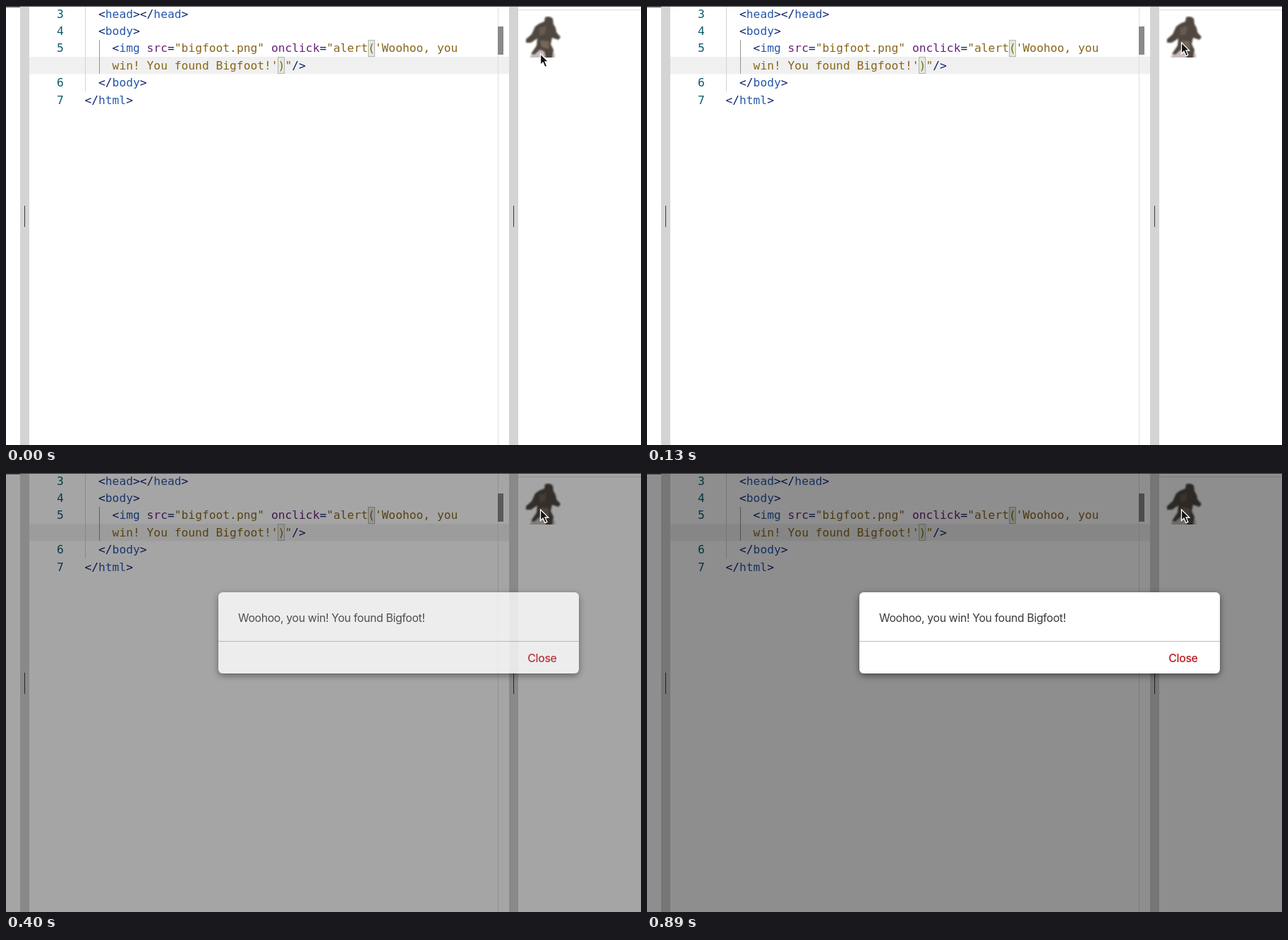
Write an HTML page that moves like this. It is 900 px wide and 622 px high and loops after 1.13 s.

```html
<!DOCTYPE html>
<html lang="en">
<head>
<meta charset="utf-8">
<title>Click alert</title>
<style>
  html, body { margin: 0; width: 100%; height: 100%; overflow: hidden; background: #fff; }
  svg { display: block; width: 900px; height: 622px; }

  .code text { font: 16.27px "DejaVu Sans Mono", monospace; white-space: pre; }
  .num { fill: #0b5a6c; }
  .punct { fill: #10206c; }
  .tag { fill: #2457ac; }
  .attr { fill: #69207a; }
  .str { fill: #87661a; }
  .bar { fill: #d4d4d4; }
  .grip { fill: #3a3a3a; }
  .match { fill: #e3e9de; stroke: #b4b4b4; }

  .dialog text { font: 15.8px Inter, sans-serif; letter-spacing: -.33px; fill: #3a3a3a; }
  .dialog .close { font-weight: 500; fill: #bd1a20; }
  .panel { fill: #fff; filter: drop-shadow(0 3px 5px rgba(0, 0, 0, .5)); }

  .cursor { animation: rise 1130ms step-end infinite; }
  .shade, .dialog { animation: appear 1130ms step-end infinite; }

  @keyframes rise {
    0% { transform: translate(757px, 67px); }
    6.19% { transform: translate(757px, 56px); }
    11.5%, 100% { transform: translate(757px, 51px); }
  }
  @keyframes appear {
    0% { opacity: 0; }
    35.39% { opacity: .8; }
    41.59% { opacity: .995; }
    46.9%, 100% { opacity: 1; }
  }
</style>
</head>
<body>
<svg viewBox="0 0 900 622">
  <defs>
    <filter id="soft" x="-20%" y="-20%" width="140%" height="140%">
      <feGaussianBlur stdDeviation="1"/>
    </filter>
    <clipPath id="crop"><rect x="735" y="14" width="52" height="59"/></clipPath>
  </defs>

  <!-- Editor panes -->
  <rect width="900" height="622" fill="#fff"/>
  <rect x="33" y="72" width="680" height="24.4" fill="#f0f0f0"/>
  <rect x="112" y="1" width="1" height="120" fill="#d3d3d3"/>
  <rect x="132" y="48" width="1" height="48" fill="#939393"/>
  <rect x="697" y="1" width="1" height="621" fill="#dedede"/>
  <rect x="697" y="29" width="8" height="40" fill="#8a8a8a"/>
  <rect class="bar" x="20" width="13" height="622"/>
  <rect class="bar" x="713" width="13" height="622"/>
  <rect class="grip" x="26" y="283" width="1" height="30"/>
  <rect class="grip" x="719" y="283" width="1" height="30"/>
  <rect x="726" y="5" width="174" height="1" fill="#dcdcdc"/>
  <rect width="900" height="1" fill="#4c4c4c"/>
  <rect width="20" height="2" fill="#4c5158"/>

  <!-- Code -->
  <rect class="match" x="513.5" y="48.5" width="9" height="23"/>
  <rect class="match" x="385.5" y="72.5" width="9" height="23"/>
  <g class="code">
    <g class="num">
      <text x="72" y="16.5">3</text>
      <text x="72" y="40.9">4</text>
      <text x="72" y="65.3">5</text>
      <text x="72" y="114.1">6</text>
      <text x="72" y="138.5">7</text>
    </g>
    <g class="punct">
      <text x="131" y="16.5">&lt;<tspan class="tag">head</tspan>&gt;&lt;/<tspan class="tag">head</tspan>&gt;</text>
      <text x="131" y="40.9">&lt;<tspan class="tag">body</tspan>&gt;</text>
      <text x="150.6" y="65.3">&lt;<tspan class="tag">img</tspan> <tspan class="attr">src</tspan>=<tspan class="str">"bigfoot.png"</tspan> <tspan class="attr">onclick</tspan>=<tspan class="str">"alert('Woohoo, you</tspan></text>
      <text x="150.6" y="89.7"><tspan class="str">win! You found Bigfoot!')"</tspan>/&gt;</text>
      <text x="131" y="114.1">&lt;/<tspan class="tag">body</tspan>&gt;</text>
      <text x="111.4" y="138.5">&lt;/<tspan class="tag">html</tspan>&gt;</text>
    </g>
  </g>

  <!-- Soft figure -->
  <g clip-path="url(#crop)">
    <g filter="url(#soft)">
      <path d="M748 62L762 58L778 68V76H741Z" fill="#c9bdc0"/>
      <path d="M764 16Q771 13 775 18L776 26Q780 31 780 37L786 44L783 48L774 45L772 54L776 62L774 76H765L763 65L757 62L749 69L744 68L752 56L753 46L744 52L737 52L737 47L745 40L750 29Q756 24 763 22Z" fill="#50473f"/>
      <path d="M756 31L766 28L764 40L756 42Z" fill="#665b51"/>
      <path d="M757 49L769 50L770 61L759 58Z" fill="#75675a"/>
    </g>
  </g>

  <!-- Alert -->
  <rect class="shade" width="900" height="622" fill="#000" fill-opacity=".443"/>
  <g class="dialog">
    <rect class="panel" x="301" y="169" width="511" height="115" rx="6"/>
    <rect x="301" y="238" width="511" height="1" fill="#bdbdbd"/>
    <text x="329" y="210.8">Woohoo, you win! You found Bigfoot!</text>
    <text class="close" x="739.3" y="267.6">Close</text>
  </g>

  <g class="cursor">
    <path d="M.5 .8V16.4L4 13.2L6.8 19.6L9.8 18.3L7 12H11.8Z" fill="#111" stroke="#fff" stroke-width="1.3"/>
  </g>
</svg>
</body>
</html>
```
